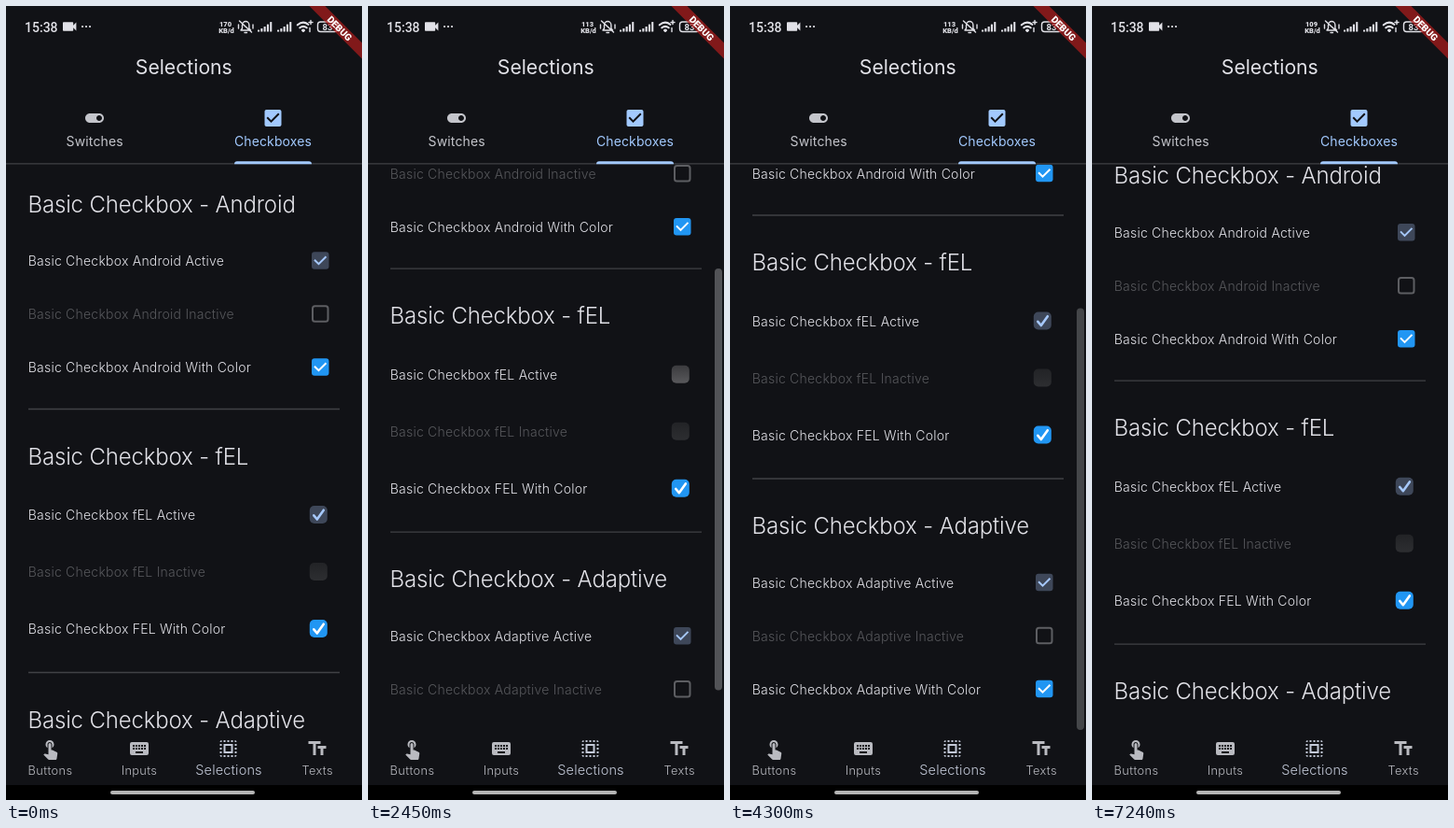
Animation of 382 by 850 pixels, one loop 7330 ms. Source, as an HTML page:

```html
<!DOCTYPE html>
<html lang="en">
<head>
<meta charset="utf-8">
<title>Selections</title>
<style>
  html, body { margin: 0; width: 100%; height: 100%; overflow: hidden; background: #111216; }
  svg { display: block; width: 382px; height: 850px; font-family: Inter, sans-serif; fill: #e2e2e8; }
  .h { font-size: 24px; font-weight: 300; letter-spacing: -.16px; }
  .row { font-size: 14px; letter-spacing: .23px; font-weight: 350; }
  .off { fill: #56575b; }
  .mid { text-anchor: middle; }
  .tab { font-size: 14px; letter-spacing: .13px; }
  .nav { font-size: 12.8px; letter-spacing: .38px; font-weight: 350; fill: #b9bac0; }
  .line { stroke: #404145; stroke-width: 1.3; }
  .stroke { fill: none; stroke: #e2e2e8; stroke-width: 1.4; stroke-linecap: round; stroke-linejoin: round; }
  .bold { stroke-width: 2.1; }
  .tick { fill: none; stroke-width: 2; }
  .round { stroke-width: 2.6; stroke-linecap: round; stroke-linejoin: round; }
  .status { font-family: Roboto, sans-serif; }
  .tiny { font-size: 7.5px; font-weight: 800; }
</style>
</head>
<body>
<svg viewBox="0 0 382 850">
  <defs>
    <clipPath id="view"><rect y="169" width="382" height="607"/></clipPath>
    <linearGradient id="empty" x2="0" y2="1"><stop stop-color="#3b3b3e"/><stop offset="1" stop-color="#58585b"/></linearGradient>
    <linearGradient id="dim" x2="0" y2="1"><stop stop-color="#222326"/><stop offset="1" stop-color="#2d2e31"/></linearGradient>
  </defs>
  <rect width="382" height="850" fill="#111216"/>

  <g clip-path="url(#view)">
    <g id="list"></g>
    <rect id="thumb" x="372" width="8" rx="4" fill="#525357"/>
  </g>

  <g class="status">
    <text x="20" y="27.8" font-size="14" font-weight="500">15:38</text>
    <g class="mid tiny"><text id="speed" x="235.5" y="21.5"></text><text x="236.5" y="29.3">KB/d</text></g>
    <path d="M82 22h.1M86 22h.1M90 22h.1" class="stroke bold"/>
    <g class="stroke">
      <path d="M252 26h10.500l-1.600-2v-3.500a3.700 4 0 0 0-7.400 0v3.500zM256 28.500h2.500M250.500 16l13 12M249.500 20v4M265 20v4"/>
      <rect x="334.500" y="17" width="21" height="10.500" rx="3"/>
      <path d="M357.500 20.500v3.500"/>
    </g>
    <g id="bars"></g>
    <path class="stroke bold" d="M312.800 20.300q6-5 11.500-.5M315.300 23.300q3.700-3 7.400 0M318 26q1-.8 2 0l-1 1z"/>
    <path class="stroke" d="M327 15.500v4M325 17.500h4M326 23.500v4"/>
    <text class="mid" x="345" y="25.600" font-size="9.500" font-weight="600">83</text>
  </g>
  <g transform="translate(382) rotate(45)">
    <rect x="-42" y="28" width="84" height="12" fill="#b71c1c" opacity=".68"/>
    <text class="mid" y="37.600" font-size="10.200" font-weight="900" fill="#fff" font-family="Roboto, sans-serif">DEBUG</text>
  </g>

  <text class="mid" x="190.800" y="73" font-size="21.200">Selections</text>
  <path class="line" d="M0 168.800h382"/>
  <path d="M245 169.300a3 3 0 0 1 3-3h77a3 3 0 0 1 3 3z" fill="#a2c9fe"/>
  <text class="mid tab" x="95.200" y="149.700" fill="#c4c5cb">Switches</text>
  <text class="mid tab" x="286.500" y="149.700" fill="#a2c9fe">Checkboxes</text>

  <text class="mid nav" x="47.500" y="823">Buttons</text>
  <text class="mid nav" x="143" y="823">Inputs</text>
  <text class="mid" x="239" y="822.500" font-size="14.500" letter-spacing=".18" font-weight="350" fill="#c3c9d8">Selections</text>
  <text class="mid nav" x="334.200" y="823">Texts</text>
  <g id="icons"></g>
  <rect y="834" width="382" height="16" fill="#000"/>
  <rect x="112" y="840" width="155" height="4" rx="2" fill="#b4b4b4"/>
</svg>
<script>
const $ = id => document.getElementById(id);

// Icons on a 24-unit grid: x, y, scale, colour, path
const icons = [
  [58.6, 12.4, .8, '#e2e2e8', 'M17 10.5V7c0-.55-.45-1-1-1H4c-.55 0-1 .45-1 1v10c0 .55.45 1 1 1h12c.55 0 1-.45 1-1v-3.5l4 4v-11l-4 4z'],
  [83, 108, 1, '#c4c5cb', 'M17 7H7c-2.76 0-5 2.24-5 5s2.24 5 5 5h10c2.76 0 5-2.24 5-5s-2.24-5-5-5zm0 8c-1.66 0-3-1.34-3-3s1.34-3 3-3 3 1.34 3 3-1.34 3-3 3z'],
  [274.5, 108, 1, '#a2c9fe', 'M19 3H5c-1.11 0-2 .9-2 2v14c0 1.1.89 2 2 2h14c1.11 0 2-.9 2-2V5c0-1.1-.89-2-2-2zm-9 14l-5-5 1.41-1.41L10 14.17l7.59-7.59L19 8l-9 9z'],
  [35.5, 783, 1, '#b9bac0', 'M9 11.24V7.5a2.5 2.5 0 0 1 5 0v3.74c1.21-.81 2-2.18 2-3.74a4.5 4.5 0 0 0-9 0c0 1.56.79 2.93 2 3.74zm9.84 4.63l-4.54-2.26c-.17-.07-.35-.11-.54-.11H13v-6a1.5 1.5 0 0 0-3 0v10.74l-3.43-.72c-.4-.1-.8 0-1.03.3l-.79.8 4.94 4.94c.27.27.65.44 1.06.44h6.79c.75 0 1.33-.55 1.44-1.28l.75-5.27c.1-.7-.3-1.35-.89-1.58z'],
  [131, 783, 1, '#b9bac0', 'M20 5H4a2 2 0 0 0-2 2v10a2 2 0 0 0 2 2h16a2 2 0 0 0 2-2V7a2 2 0 0 0-2-2z' +
    [5, 8, 11, 14, 17].map(x => `M${x} 8v2h2v-2zm0 3v2h2v-2z`).join('') + 'M8 15v2h8v-2z'],
  [226.5, 783, 1, '#c3c9d8', 'M7 17h10V7H7zM9 9v6h6V9zM3 5h2V3a2 2 0 0 0-2 2zM19 3v2h2a2 2 0 0 0-2-2zM5 21v-2H3a2 2 0 0 0 2 2zM19 21a2 2 0 0 0 2-2h-2z' +
    [7, 11, 15].map(p => `M${p} 3h2v2h-2zM${p} 19h2v2h-2zM3 ${p}h2v2h-2zM19 ${p}h2v2h-2z`).join('')],
  [322, 783, 1, '#b9bac0', 'M2.5 4v3h5v12h3V7h5V4h-13zm19 5h-9v3h3v7h3v-7h3V9z']
];
$('icons').innerHTML = icons.map(([x, y, k, color, d]) =>
  `<path transform="translate(${x} ${y}) scale(${k})" fill="${color}" fill-rule="evenodd" d="${d}"/>`).join('');

$('bars').innerHTML = [270, 291].map(x => [2, 3.5, 5.5, 8, 10.5].map((h, i) =>
  `<rect x="${x + i * 3.3}" y="${27.5 - h}" width="2.1" height="${h}" rx=".6"/>`).join('')).join('');

function squareBox(y, fill, tick) {
  return fill
    ? `<rect x="328" y="${y - 9}" width="18.500" height="18.500" rx="3" fill="${fill}"/>
       <path class="tick" stroke="${tick}" d="M331 ${y - .5}l4.500 4.500 8-8"/>`
    : `<rect x="329" y="${y - 8}" width="16.500" height="16.500" rx="2.500" fill="none" stroke="#5d5e62" stroke-width="2"/>`;
}

function roundBox(y, fill, tick, id = '') {
  return `<rect ${id && `id="${id}Fill"`} x="325.800" y="${y - 9.5}" width="19" height="19" rx="5" fill="${fill}"/>` +
    (tick ? `<path ${id && `id="${id}Tick"`} class="tick round" stroke="${tick}" d="M330.300 ${y + .8}l3.500 4.200 7-9.800"/>` : '');
}

function section(name, y, step, round, altName = name) {
  const ys = [0, 1, 2].map(i => y + (round ? 63 : 61) + i * step);
  const label = (i, text) => `<text class="row ${i == 1 ? 'off' : ''}" x="23.700" y="${ys[i] + 5}">Basic Checkbox ${text}</text>`;
  const active = '#3e4759', blue = '#2196f3', pale = '#a6c8fb';
  const boxes = round
    ? roundBox(ys[0] - .5, active, pale, 'live') + roundBox(ys[1] - .5, 'url(#dim)') + roundBox(ys[2] - .5, blue, '#fff')
    : squareBox(ys[0] - .8, active, pale) + squareBox(ys[1] - .8) + squareBox(ys[2] - .8, blue, '#fff');
  return `<text class="h" x="23.500" y="${y + 8.5}">Basic Checkbox - ${name}</text>` +
    label(0, name + ' Active') + label(1, name + ' Inactive') + label(2, altName + ' With Color') + boxes;
}

$('list').innerHTML =
  section('Android', 212, 57) +
  section('fEL', 482, 61, true, 'FEL') +
  section('Adaptive', 764, 57) +
  '<path class="line" d="M24 431.500h334M24 713.500h334"/>';

const LOOP = 7330, MAX = 207.5, TOP = 169, VIEW = 606;
const ramp = (t, a, b) => Math.min(1, Math.max(0, (t - a) / (b - a)));
const fling = (t, start, tau) => t < start ? 0 : 1 - Math.exp((start - t) / tau);

function scrollAt(t) {
  const back = ramp(t, 3240, 3700);
  return 150.5 * fling(t, 1850, 90)
    + 86.5 * fling(t, 2750, 70)
    - 29.5 * (1 - (1 - back) ** 3)
    - 177.2 * fling(t, 5520, 105);
}

function barAlpha(t) {
  return ramp(t, 1850, 2000) - .2 * ramp(t, 4210, 4300) - .8 * ramp(t, 4300, 4560)
    + ramp(t, 5490, 5690) - ramp(t, 6640, 6790);
}

function draw(now) {
  const t = now % LOOP;
  const scroll = scrollAt(t), over = Math.max(0, scroll - MAX);
  const full = VIEW * VIEW / (VIEW + MAX), height = full - over * .78;
  $('list').setAttribute('transform', `translate(0 ${-scroll})`);
  $('thumb').setAttribute('y', TOP + (VIEW - height) * Math.min(1, scroll / MAX));
  $('thumb').setAttribute('height', height);
  $('thumb').setAttribute('opacity', barAlpha(t));

  const checked = t < 2390 || t >= 2680;
  $('liveFill').setAttribute('fill', checked ? '#3e4759' : 'url(#empty)');
  $('liveTick').setAttribute('opacity', +checked);
  $('speed').textContent = t < 820 ? 170 : t < 4800 ? 113 : 109;
}

const start = performance.now();
(function frame() {
  draw(performance.now() - start);
  requestAnimationFrame(frame);
})();
</script>
</body>
</html>
```
